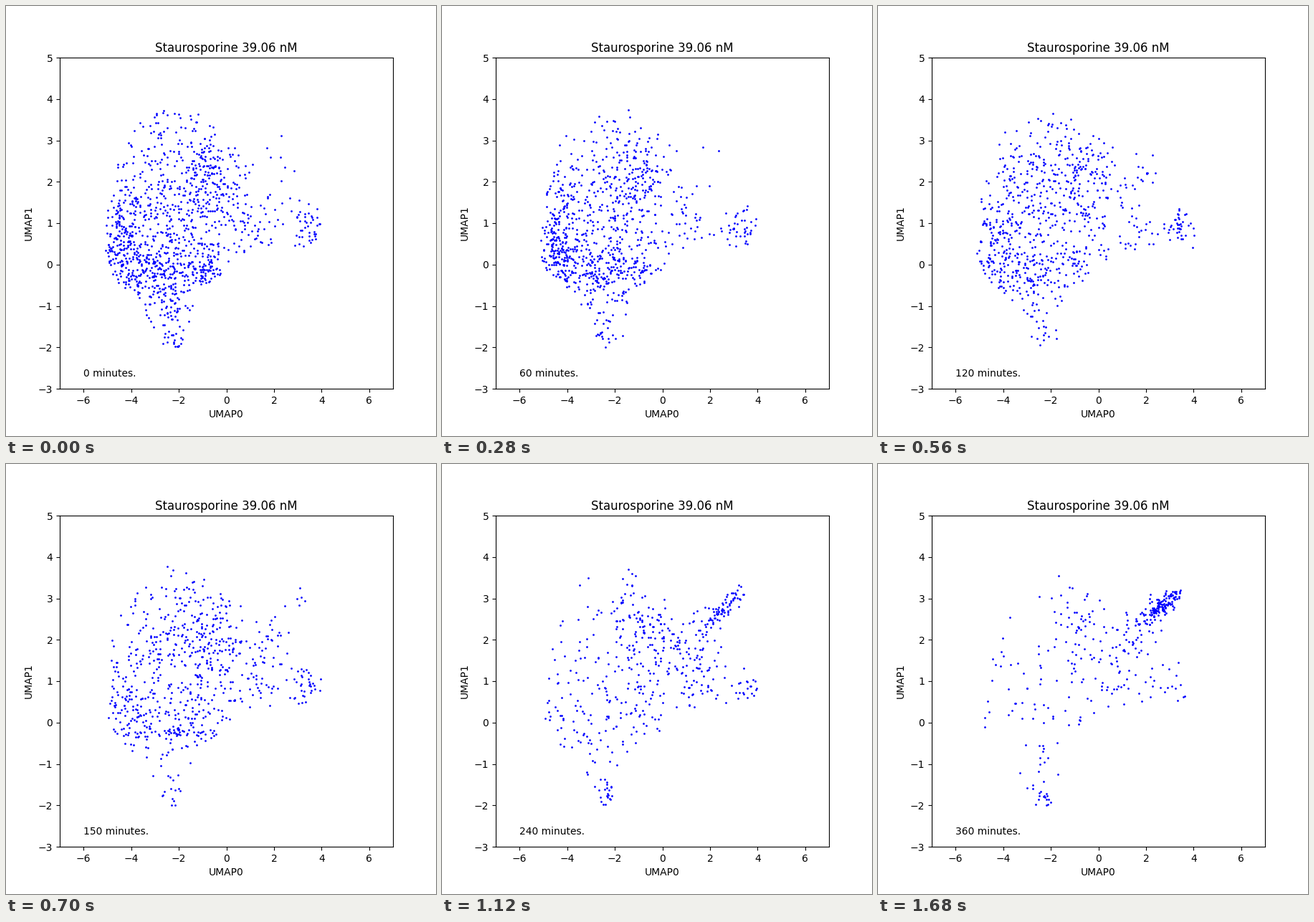
Animation of 600x600 px, one loop 1820 ms. Source, as a matplotlib script:

```python
import numpy as np
import matplotlib.pyplot as plt
from matplotlib.animation import FuncAnimation
from matplotlib.path import Path

FRAMES = 13
STEP_MIN = 30

rng = np.random.default_rng(39)

# Border of the embedding, clockwise from the left edge
OUTLINE = Path([
    (-5.12, 0.2), (-5.12, 0.8), (-4.85, 1.9), (-4.6, 2.6), (-4.1, 3.1),
    (-3.5, 3.55), (-2.6, 3.78), (-1.4, 3.75), (-0.7, 3.45), (-0.1, 3.1),
    (0.8, 2.8), (1.6, 2.85), (2.7, 3.3), (3.2, 3.35), (3.5, 3.2),
    (3.2, 2.4), (3.2, 1.6), (3.8, 1.4), (4.2, 0.6), (4.0, 0.35),
    (2.6, 0.48), (0.9, 0.3), (-0.3, -0.35), (-1.3, -0.6), (-1.6, -1.5),
    (-1.7, -1.9), (-2.1, -2.06), (-2.7, -2.06), (-3.4, -1.2),
    (-3.7, -0.75), (-4.3, -0.6), (-4.85, -0.2),
])

# Cell clusters: centre x, centre y, spread x, spread y, slope
CLUSTERS = {
    "west": (-2.9, 1.3, 1.3, 1.4, 0),
    "east": (-0.9, 1.5, 0.9, 1.1, 0),
    "rim": (-4.4, 0.5, 0.4, 0.6, 0),
    "low": (-3.0, -0.2, 1.1, 0.3, 0),
    "corner": (-0.9, -0.15, 0.35, 0.25, 0.2),
    "upper": (-0.6, 2.3, 0.7, 0.45, -0.2),
    "tail": (-2.3, -1.8, 0.28, 0.14, 0),
    "neck": (-2.5, -1.1, 0.45, 0.3, 0),
    "bridge": (1.4, 0.85, 0.9, 0.35, 0),
    "arm": (3.4, 0.9, 0.35, 0.27, 0),
    "middle": (1.4, 1.8, 0.7, 0.55, 0.2),
    "streak": (2.65, 2.82, 0.45, 0.13, 0.42),
}

# Cells per cluster, once an hour
COUNTS = {
    "west": (390, 350, 300, 220, 100, 55, 40),
    "east": (170, 110, 130, 130, 90, 60, 45),
    "rim": (145, 160, 70, 30, 12, 5, 2),
    "low": (150, 140, 90, 45, 25, 14, 8),
    "corner": (60, 20, 12, 8, 5, 3, 2),
    "upper": (90, 55, 65, 65, 65, 40, 30),
    "tail": (18, 12, 8, 7, 14, 20, 17),
    "neck": (38, 9, 7, 8, 12, 10, 7),
    "bridge": (40, 28, 28, 25, 30, 28, 20),
    "arm": (38, 35, 38, 30, 20, 14, 8),
    "middle": (22, 8, 20, 65, 75, 80, 65),
    "streak": (0, 0, 1, 12, 65, 105, 135),
}


def sample(n, cx, cy, sx, sy, slope):
    """Draw n cells from a sheared normal cloud inside the outline."""
    dx, dy = rng.normal(size=(2, 8 * n + 20))
    pts = np.column_stack([cx + sx * dx, cy + slope * sx * dx + sy * dy])
    return pts[OUTLINE.contains_points(pts)][:n]


def cells(hour):
    return np.vstack([
        sample(round(np.interp(hour, range(7), COUNTS[name])), *shape)
        for name, shape in CLUSTERS.items()
    ])


clouds = [cells(i * STEP_MIN / 60) for i in range(FRAMES)]

fig, ax = plt.subplots(figsize=(6, 6), dpi=100)
ax.set(xlim=(-7, 7), ylim=(-3, 5), xlabel="UMAP0", ylabel="UMAP1",
       title="Staurosporine 39.06 nM")
dots, = ax.plot([], [], "b.", markersize=2)
label = ax.text(-6, -2.7, "")


def update(i):
    dots.set_data(*clouds[i].T)
    label.set_text(f"{i * STEP_MIN} minutes.")
    return dots, label


anim = FuncAnimation(fig, update, frames=FRAMES, interval=140,
                     repeat=True, repeat_delay=0)
plt.show()
```
